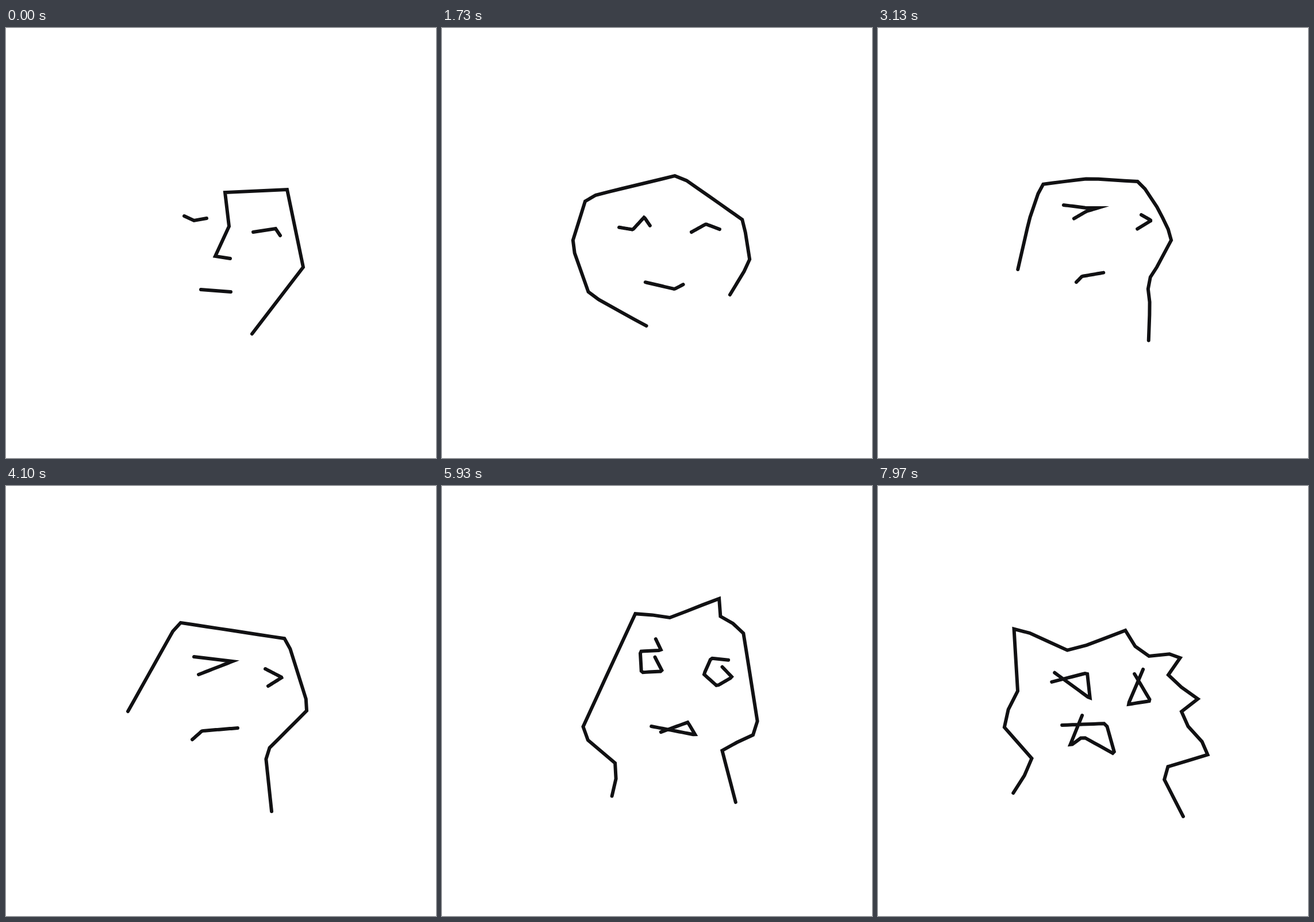
An HTML page for the animation above (8 s loop, 748 by 748 pixels).

```html
<!DOCTYPE html>
<html lang="en">
<head>
<meta charset="utf-8">
<title>Morphing line face</title>
<style>
html, body { margin: 0; width: 100%; height: 100%; overflow: hidden; background: #fff; }
svg { display: block; }
path { fill: none; stroke: #111113; stroke-width: 6; stroke-linecap: round; stroke-miterlimit: 10; }
</style>
</head>
<body>
<svg width="748" height="748"><path/><path/><path/><path/></svg>
<script>
const LOOP = 8000, FIRST = 530, STEP = 2015, MORPH = 1850, SAMPLES = 32;
const paths = [...document.querySelectorAll('path')];

// A polygon that curls inwards at its last point.
function coil(x, y, sides) {
  return Array.from({ length: sides + 1 }, (_, i) => {
    const a = -0.84 - i * 2 * Math.PI / sides, r = i < sides ? 26 : 10;
    return `${x + r * Math.cos(a)} ${y + r * Math.sin(a)}`;
  }).join('L');
}

// Corner points of each face: outline, left eye, right eye, mouth.
const faces = [
  ['M390 401L364 397 388 345 381 286 489 281 517 416 428 532',
   'M310 327L327 335 349 331', 'M477 361L469 349 430 355', 'M339 455L391 459'],
  ['M355 520L254 465 223 378 248 295 410 254 525 333 537 405 502 463',
   'M308 347L332 351 352 329 362 344', 'M483 350L459 341 434 355', 'M354 442L405 454 420 446'],
  ['M212 392L299 237 489 266 527 387 451 463 462 566',
   'M327 297L394 305 335 328', 'M451 318L480 333 456 348', 'M403 421L341 426 324 441'],
  ['M296 540L308 488 240 431 337 220 397 229 482 195 485 236 522 241 552 428 487 458 511 550',
   'M372 266L' + coil(364, 305, 4), 'M' + coil(481, 322, 5), 'M364 418L441 433 428 411 381 428'],
  ['M235 534L271 478 214 413 243 357 236 243 334 288 434 250 456 298 532 290 502 333 557 370 521 398 582 465 489 493 531 575',
   'M307 325L369 370 364 325 302 341', 'M446 327L474 374 435 380 461 319',
   'M320 416L397 413 412 467 356 436 333 453 355 399']
];

// Evenly spaced points along a stroke.
function sample(d) {
  paths[0].setAttribute('d', d);
  const step = paths[0].getTotalLength() / (SAMPLES - 1);
  return Array.from({ length: SAMPLES }, (_, k) => paths[0].getPointAtLength(k * step));
}
const points = faces.map(face => face.map(sample));

const mix = (a, b, p) => a + (b - a) * p;
const morph = (from, to, p) =>
  'M' + from.map((a, k) => `${mix(a.x, to[k].x, p)} ${mix(a.y, to[k].y, p)}`).join('L');

function draw(t) {
  const i = Math.floor((t - FIRST) / STEP);
  const u = Math.min(1, (t - FIRST - i * STEP) / MORPH);
  const p = 1 - (1 - u) ** 4;
  paths.forEach((path, j) => path.setAttribute('d',
    i < 0 ? faces[0][j] : morph(points[i][j], points[i + 1][j], p)));
}

let began;
function tick(now) {
  began ??= now;
  draw((now - began) % LOOP);
  requestAnimationFrame(tick);
}
draw(0);
requestAnimationFrame(tick);
</script>
</body>
</html>
```
